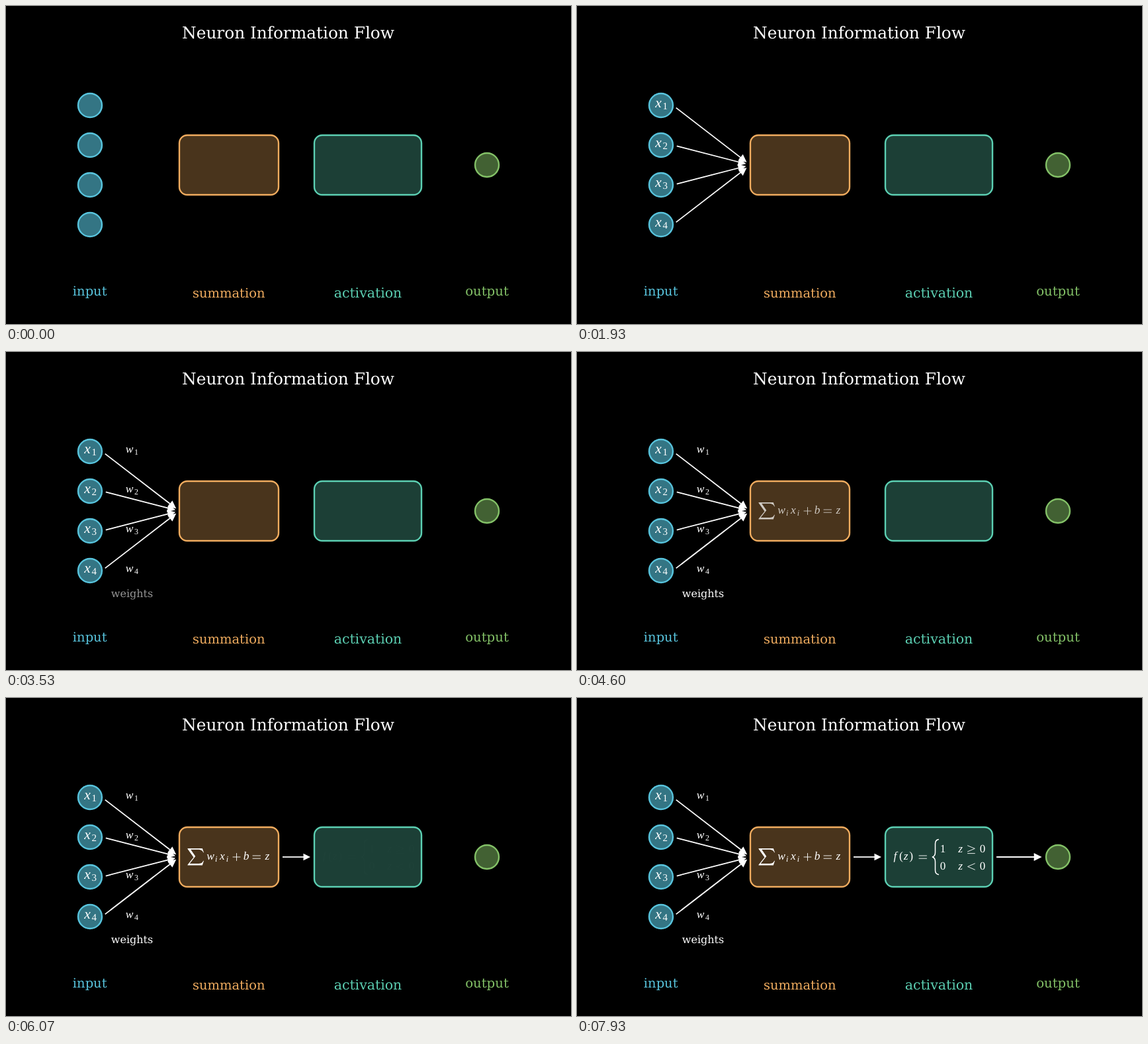
These frames come from a looping animation (854x480 px, 8000 ms). An HTML page:

```html
<!DOCTYPE html>
<html lang="en">
<head>
<meta charset="utf-8">
<title>Neuron Information Flow</title>
<style>
  html, body { margin: 0; width: 100%; height: 100%; overflow: hidden; background: #000; }
  svg { display: block; width: 100vw; height: 100vh; }
  text { font-family: "DejaVu Serif", serif; text-anchor: middle; text-rendering: geometricPrecision; }
  .math { font-family: "Liberation Serif", serif; fill: #fff; }
  .var { font-style: italic; }
  .rule { fill: none; stroke: #fff; stroke-linecap: round; stroke-linejoin: round; }
</style>
</head>
<body>
<svg id="stage" viewBox="0 0 854 480"></svg>
<script>
const BLUE = '#58c4dd', GOLD = '#f0ac5f', TEAL = '#5cd0b3', GREEN = '#83c167', WHITE = '#fff';
const FPS = 15, LOOP_FRAMES = 120;
const stage = document.getElementById('stage');
const rows = [150, 210, 270, 330];

function add(tag, attrs, parent = stage, content = '') {
  const el = document.createElementNS('http://www.w3.org/2000/svg', tag);
  for (const key in attrs) el.setAttribute(key, attrs[key]);
  el.textContent = content;
  parent.append(el);
  return el;
}

const label = (content, x, y, size, fill) =>
  add('text', { x, y, 'font-size': size, fill }, stage, content);

const glyph = (content, x, y, size, parent) =>
  add('text', { x, y, 'font-size': size, class: /[a-z]/.test(content) ? 'math var' : 'math' }, parent, content);

const rule = (d, parent, width = .9) =>
  add('path', { d, class: 'rule', 'stroke-width': width }, parent);

const disc = (cx, cy, color, opacity) =>
  add('circle', { cx, cy, r: 18, fill: color, 'fill-opacity': opacity, stroke: color, 'stroke-width': 2.4 });

const box = (x, width, color) =>
  add('rect', { x, y: 195, width, height: 90, rx: 12, fill: color, 'fill-opacity': .3, stroke: color, 'stroke-width': 2.4 });

// An arrow in its own frame, pointing along +x, with a 6 px gap at both ends.
function arrow(x1, y1, x2, y2) {
  const dx = x2 - x1, dy = y2 - y1, full = Math.hypot(dx, dy);
  const length = full - 12, tip = Math.min(12, length / 4);
  const group = add('g', {});
  add('path', { d: `M0 0H${length - tip + .5}`, stroke: WHITE, 'stroke-width': 1.8 }, group);
  add('path', { d: `M${length} 0l${-tip} ${-tip / 2}v${tip}z`, fill: WHITE }, group);
  const place = `translate(${x1 + dx / full * 6} ${y1 + dy / full * 6}) ` +
    `rotate(${Math.atan2(dy, dx) * 180 / Math.PI})`;
  return { group, place };
}

const clamp = v => Math.max(0, Math.min(1, v));
const sigmoid = v => 1 / (1 + Math.exp(-v));
const smooth = t => clamp((sigmoid(10 * (t - .5)) - sigmoid(-5)) / (1 - 2 * sigmoid(-5)));

function grow(arrows, t) {
  const p = smooth(t);
  for (const { group, place } of arrows) {
    group.style.display = p > 0 ? '' : 'none';
    group.setAttribute('transform', `${place} scale(${p})`);
  }
}

function fade(el, t) { el.style.opacity = smooth(t); }

// Each glyph is outlined first, then filled; glyphs start one after another.
function write(glyphs, t) {
  const lag = .2, span = (glyphs.length - 1) * lag + 1;
  glyphs.forEach((el, i) => {
    const a = clamp(t * span - i * lag);
    const outline = clamp(a * 2), fill = clamp(a * 2 - 1);
    const perimeter = el.getAttribute('font-size') * 3.2;
    el.style.display = a > 0 ? '' : 'none';
    el.style.fillOpacity = fill;
    el.style.stroke = fill < 1 ? WHITE : 'none';
    el.style.strokeWidth = 1.2 * (1 - fill);
    el.style.strokeDasharray = outline < 1 ? `${outline * perimeter} 999` : 'none';
  });
}

add('rect', { width: 854, height: 480, fill: '#000' });
label('Neuron Information Flow', 426.5, 49, 24.8, WHITE);
rows.forEach(y => disc(127, y, BLUE, .6));
box(262, 150, GOLD);
box(466, 162, TEAL);
disc(727, 240, GREEN, .5);
label('input', 126.7, 437, 19.5, BLUE);
label('summation', 336.7, 440, 19.5, GOLD);
label('activation', 547, 440, 20.5, TEAL);
label('output', 727, 437, 19.7, GREEN);

const inputs = rows.flatMap((y, i) => [
  glyph('x', 123, y + 3.4, 21.5), glyph(String(i + 1), 133.3, y + 6.4, 15)]);
const inArrows = rows.map(y => arrow(145, y, 262, 240));
const weights = rows.flatMap((y, i) => [
  glyph('w', 186.6, y + 2.2, 17.5), glyph(String(i + 1), 197, y + 5, 12)]);
const weightsLabel = label('weights', 190.5, 370, 16, WHITE);

const sum = add('g', {});
add('path', { fill: WHITE, d: 'M274.5 227H296.8L299 233.2H298.2C296.5 229 293 228.7 288 228.7H279.2' +
  'L286.3 239L277.6 250H288C293 250 296.5 249.8 298.2 245.7H299L296.8 252.6H274.5V251.8L283.5 240.6L274.5 227.8Z' }, sum);
[['w', 309], ['x', 326.8], ['b', 363], ['z', 395]].forEach(([c, x]) => glyph(c, x, 244.2, 17.5, sum));
[317.8, 334.6].forEach(x => glyph('i', x, 246.8, 12.5, sum));
rule('M343 240h11M348.5 234.5v11M373 238h11.5M373 242.2h11.5', sum);

const step = add('g', {});
[['f', 481], ['(', 489.8], ['z', 497.2], [')', 505.2]].forEach(([c, x]) => glyph(c, x, 244.2, 17.5, step));
rule('M517 238h11.5M517 242.2h11.5', step);
rule('M546.3 213.5Q541.5 214.5 541.5 220V233Q541.5 238.5 537.3 240Q541.5 241.5 541.5 247V260Q541.5 265.5 546.3 266.5', step, 1.5);
['1', '0'].forEach((digit, i) => {
  const y = 232.8 + 26 * i;
  glyph(digit, 553, y, 17, step);
  glyph('z', 579.7, y, 17.5, step);
  glyph('0', 613, y, 17, step);
});
rule('M590.5 222.8L601.3 227.3L590.5 231.8M590.5 234.6H601.3M601.3 249.8L590.5 254.5L601.3 259.2', step);

const midArrow = arrow(412, 240, 466, 240);
const outArrow = arrow(628, 240, 709, 240);

// One action per second.
const timeline = [
  t => write(inputs, t),
  t => grow(inArrows, t),
  t => write(weights, t),
  t => fade(weightsLabel, t),
  t => fade(sum, t),
  t => grow([midArrow], t),
  t => fade(step, t),
  t => grow([outArrow], t),
];

const start = performance.now();
function draw(now) {
  const elapsed = Math.max(0, now - start);
  const frame = Math.floor(elapsed * FPS / 1000 + .06) % LOOP_FRAMES;
  timeline.forEach((action, i) => action(clamp(frame / FPS - i)));
  requestAnimationFrame(draw);
}
draw(start);
</script>
</body>
</html>
```
